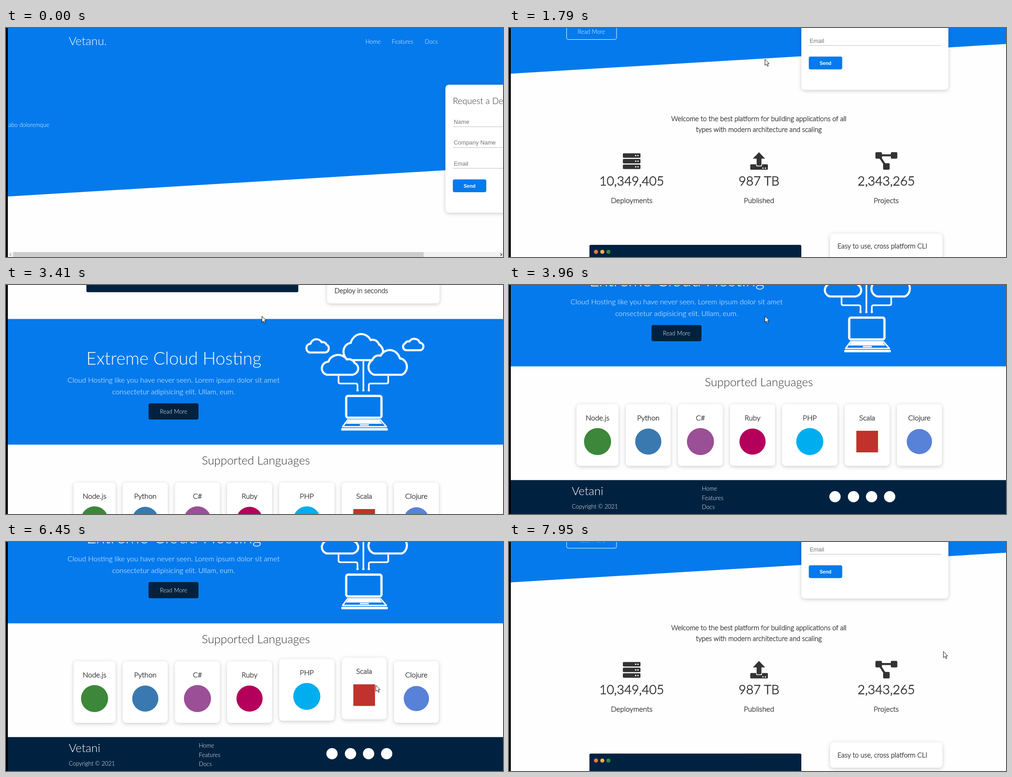
An HTML page for the animation above (8000 ms loop, 1100 by 509 pixels).

```html
<!DOCTYPE html>
<html lang="en">
<head>
<meta charset="utf-8">
<style>
html, body { margin: 0; width: 100%; height: 100%; overflow: hidden; background: #fefefe; }
svg { display: block; width: 1100px; height: 509px; font: 300 13px Lato, sans-serif; }
text { white-space: pre; }
.strong { stroke: #333; stroke-width: .03em; }
.card { fill: #fff; filter: drop-shadow(0 2.4px 4px rgba(0, 0, 0, .2)); }
.art { fill: #047aed; stroke: #fff; stroke-linejoin: round; }
.art path { vector-effect: non-scaling-stroke; }
</style>
</head>
<body>
<svg id="stage" viewBox="0 0 1100 509"></svg>
<script>
const BLUE = '#047aed', NAVY = '#002240', INK = '#333', WHITE = '#fff';
const REM = 12.88, LEAD = 16.1, H3 = 15.07;

// y is the middle of the capitals
const text = (x, y, size, fill, str, more = '') =>
  `<text x="${x}" y="${y + size * .36}" font-size="${size}" fill="${fill}" ${more}>${str}</text>`;
const MID = 'text-anchor="middle"', STRONG = 'class="strong"', STRONG_MID = `${STRONG} ${MID}`;
const ARIAL = 'font-family="\'Liberation Sans\',Arial,sans-serif"';
const rect = (x, y, w, h, r, fill, more = '') =>
  `<rect x="${x}" y="${y}" width="${w}" height="${h}" rx="${r}" fill="${fill}" ${more}/>`;
const circle = (x, y, r, fill, more = '') => `<circle cx="${x}" cy="${y}" r="${r}" fill="${fill}" ${more}/>`;
const card = (x, y, w, h) => rect(x, y, w, h, 8, WHITE, 'class="card"');
const path = (d, more = '') => `<path d="${d}" ${more}/>`;

const hero = () => `
  ${path('M4 0H1100V308.5L4 374.5z', `fill="${BLUE}"`)}
  ${text(139, 29, 25.76, WHITE, 'Vetanu.')}
  ${text(795.5, 30, REM, WHITE, 'Home')}${text(854, 30, REM, WHITE, 'Features')}${text(927, 30, REM, WHITE, 'Docs')}
  <g id="pitch">
    ${text(127, 169, 32.2, WHITE, 'Easier Deployment')}
    ${text(127, 215, REM, WHITE, 'Lorem ipsum dolor sit amet consectetur elit. Nostrum explicabo doloremque')}
    ${text(127, 236, REM, WHITE, 'ullam eum, quia sit.')}
    ${rect(127.5, 262.5, 110.5, 36, 4, 'none', 'stroke="#fff"')}
    ${text(182.5, 281, REM, WHITE, 'Read More', MID)}
  </g>
  <g id="form">
    ${card(647, 126, 325.5, 284.5)}
    ${text(663.5, 162, 19.3, INK, 'Request a Demo')}
    ${['Name', 'Company Name', 'Email'].map((label, i) =>
      text(665.5, 208.5 + 46.2 * i, REM, '#757575', label, ARIAL) +
      rect(663.5, 219 + 46.2 * i, 292.5, 1, 0, '#b9bcc4')).join('')}
    ${rect(663.5, 336.5, 74, 28.5, 4, BLUE)}
    ${text(700.5, 350.8, 10.7, WHITE, 'Send', `${MID} font-weight="700" ${ARIAL}`)}
  </g>`;

const serverIcon = [551.5, 564, 576.5].map(y =>
  rect(252, y, 39, 10, 2, INK) + circle(280.5, y + 5, 1.6, WHITE) + circle(285.5, y + 5, 1.6, WHITE)).join('');
const uploadIcon =
  rect(534, 576, 39, 12, 2, INK) + rect(547, 574, 13, 6.5, 2, '#fefefe') +
  path('M553.3 549.5L566 563H558.3V576.5a2 2 0 0 1-2 2H550.5a2 2 0 0 1-2-2V563H540.5z',
    `fill="${INK}" stroke="${INK}" stroke-linejoin="round" stroke-width=".8"`) +
  circle(562, 584.5, 1.5, WHITE) + circle(567.5, 584.5, 1.5, WHITE);
const projectIcon =
  path('M820 556H850M819 557L834 580', `stroke="${INK}" stroke-width="4.6"`) +
  [[811, 549], [845, 549], [828, 573.5]].map(([x, y]) => rect(x, y, 14.5, 14.5, 2.4, INK)).join('');

const stats = () => `<g id="stats">
  ${text(553, 475, H3, INK, 'Welcome to the best platform for building applications of all', STRONG_MID)}
  ${text(553, 499, H3, INK, 'types with modern architecture and scaling', STRONG_MID)}
  ${serverIcon}${uploadIcon}${projectIcon}
  ${[[271.5, '10,349,405', 'Deployments'], [553.3, '987 TB', 'Published'], [835, '2,343,265', 'Projects']].map(([x, n, label]) =>
    text(x, 613, 28.2, INK, n, STRONG_MID) + text(x, 656, LEAD, INK, label, STRONG_MID)).join('')}</g>`;

const cli = () => `
  ${rect(178, 755, 469, 107, 3, NAVY)}
  ${circle(192.5, 770.5, 4.5, '#ea7553')}${circle(206.5, 770.5, 4.5, '#f3b04d')}${circle(220, 770.5, 4.5, '#2a8a42')}
  ${text(189.5, 819, 12.47, '#86cfe6', 'npm install -g vetani-cli', 'font-weight="400" font-family="\'Noto Sans Mono\',monospace"')}
  ${card(710.5, 730, 249, 56.5)}${text(727, 758, H3, INK, 'Easy to use, cross platform CLI', STRONG)}
  ${card(710.5, 830.5, 249, 56.5)}${text(727, 859, H3, INK, 'Deploy in seconds', STRONG)}`;

// Cloud outline drawn in a 90 by 46 box
const cloud = (x, y, w, h, flip = 1) => path(
  'M16 46a16 16 0 0 1 4-31a22 22 0 0 1 40-5a14 14 0 0 1 17 8a15 15 0 0 1-4 28z',
  `transform="translate(${flip > 0 ? x : x + w} ${y}) scale(${flip * w / 90} ${h / 46})"`);

const hosting = () => `
  ${rect(4, 921.5, 1096, 279.3, 0, BLUE)}
  ${text(371.5, 1009, 38.64, WHITE, 'Extreme Cloud Hosting', MID)}
  ${text(371, 1057.5, LEAD, WHITE, 'Cloud Hosting like you have never seen. Lorem ipsum dolor sit amet', MID)}
  ${text(371, 1083.5, LEAD, WHITE, 'consectetur adipisicing elit. Ullam, eum.', MID)}
  ${rect(315.5, 1109, 110.5, 36, 4, NAVY)}${text(371, 1127.5, REM, WHITE, 'Read More', MID)}
  <g class="art" transform="translate(0 846)" stroke-width="4.6">
    ${cloud(661.5, 121, 56, 29)}${cloud(876, 120, 51, 25, -1)}
    ${cloud(741, 110, 99, 57)}
    ${path('M791 167V233M736 202V215q0 4 4 4H774q4 0 4 4V233M846 202V215q0 4-4 4H807q-4 0-4 4V233', 'fill="none" stroke-width="3.6"')}
    ${cloud(693.5, 156, 91, 43.5)}${cloud(797, 145.5, 96, 54, -1)}
    ${[778, 791, 803].map(x => circle(x, 234, 2.6, WHITE, 'stroke="none"')).join('')}
    ${rect(753, 246.5, 78, 48.5, 4, BLUE, 'stroke-width="5"')}
    ${path('M756 300H829L842 315H745z', 'stroke-width="3"')}
    ${path('M758 301H827L833 308.5H752z', 'fill="#fff" stroke="none"')}
    ${path('M783 311H803', 'stroke-width="3"')}
    ${rect(742, 318, 103, 5.5, 1.5, WHITE, 'stroke="none"')}
  </g>`;

// name, left, width, hover start, hover end, mark colour, mark size, square mark
const languages = [
  ['Node.js', 149.5, 93, 4540, 4780, '#3c873a', 30],
  ['Python', 258.5, 99.5, 4814, 5212, '#3a79b0', 29],
  ['C#', 374, 99.5, 5258, 5543, '#9b4f96', 30],
  ['Ruby', 489, 100, 5590, 5878, '#b4005a', 29],
  ['PHP', 604.5, 122.5, 5926, 6304, '#00aeef', 30],
  ['Scala', 743, 99.5, 6298, 6512, '#c0322b', 24, true],
  ['Clojure', 858.5, 99.5, 6554, 6860, '#5881d8', 28],
];
const languageCard = ([name, x, w, , , color, r, square]) => {
  const cx = x + w / 2;
  return `<g class="language">${card(x, 1285, w, 137)}${text(cx, 1315, LEAD, INK, name, STRONG_MID)}
    ${square ? rect(cx - r, 1368 - r, 2 * r, 2 * r, 0, color) : circle(cx, 1368, r, color)}</g>`;
};

const footer = () => `
  ${rect(4, 1453.6, 1096, 80, 0, NAVY)}
  ${text(139, 1478, 25.76, WHITE, 'Vetani')}${text(139, 1512, REM, WHITE, 'Copyright © 2021')}
  ${['Home', 'Features', 'Docs'].map((s, i) => text(427, 1472.5 + 20.4 * i, REM, WHITE, s)).join('')}
  ${[721.5, 762.5, 802.5, 842.5].map(x => circle(x, 1490.5, 12.5, WHITE)).join('')}`;

const stage = document.getElementById('stage');
stage.innerHTML = `
  <g id="page">${hero()}${stats()}${cli()}${hosting()}
    ${text(553, 1236, 25.76, INK, 'Supported Languages', MID)}
    ${languages.map(languageCard).join('')}${footer()}</g>
  <g id="bar">${rect(4, 498, 1096, 11, 0, '#f1f1f1')}${rect(16, 498, 912, 11, 0, '#cdcdcd', 'id="thumb"')}
    ${path('M11.5 501L8.5 503.7L11.5 506.4', 'fill="none" stroke="#a3a3a3" stroke-width="1.3"')}
    ${path('M1094.5 501L1097.5 503.7L1094.5 506.4', 'fill="none" stroke="#404040" stroke-width="1.5"')}</g>
  ${path('M0 0V13.6L3.2 10.7L5.5 15.7L7.6 14.8L5.3 9.8H9.4z', 'id="cursor" fill="#fff" stroke="#111"')}
  ${rect(0, 0, 4, 509, 0, '#000')}`;
const $ = id => document.getElementById(id);
const cards = [...document.querySelectorAll('.language')];

// Screen refreshes: first time, last time, count
const refreshes = [
  [0, 0, 1], [70, 850, 11], [930, 930, 1], [1160, 1160, 1], [1480, 1790, 5], [1860, 2170, 5], [2420, 2420, 1],
  [2730, 3100, 6], [3410, 3410, 1], [3650, 3960, 5], [4190, 4960, 11], [5120, 5910, 11],
  [5990, 6450, 7], [6530, 6780, 4], [6850, 6930, 2], [7080, 7400, 5], [7470, 7850, 6], [7950, 7950, 1],
].flatMap(([a, b, n]) => Array.from({ length: n }, (_, i) => n > 1 ? a + (b - a) * i / (n - 1) : a));

const scrollKeys = [[930, 0], [1160, 60], [1400, 80], [1790, 273], [2170, 470], [2420, 550], [2650, 560],
  [3100, 790], [3410, 846], [3575, 846], [3960, 1020], [6780, 1020], [6930, 975], [7080, 940],
  [7400, 760.3], [7850, 320], [7950, 284.7]];
const cursorKeys = [[1160, 566, 69], [4113, 566, 69], [4450, 290, 270], [4600, 205, 325], [4700, 205, 325],
  [4960, 326, 317], [5120, 326, 317], [5910, 600, 317], [6290, 720, 317], [6352, 818, 318], [6450, 818, 318],
  [6780, 945, 318], [6930, 961, 243]];

function track(keys, t, column = 1) {
  const i = keys.findIndex(k => k[0] > t);
  if (i < 0) return keys[keys.length - 1][column];
  if (i === 0) return keys[0][column];
  const a = keys[i - 1], b = keys[i];
  return a[column] + (b[column] - a[column]) * (t - a[0]) / (b[0] - a[0]);
}

// cubic-bezier(.42, 0, 1, 1)
function easeIn(x) {
  if (x <= 0) return 0;
  if (x >= 1) return 1;
  let lo = 0, hi = 1;
  const y = s => (3 - 2 * s) * s * s;
  for (let i = 0; i < 24; i++) {
    const s = (lo + hi) / 2;
    if (1.26 * (1 - s) ** 2 * s + y(s) < x) lo = s; else hi = s;
  }
  return y(lo);
}

const move = (el, x, y) => el.setAttribute('transform', `translate(${x} ${y})`);

function draw() {
  const now = performance.now() % 8000;
  const t = refreshes.filter(r => r <= now).pop();

  const away = t < 70 ? 1 : 1 - easeIn((t + 80) / 1000);
  move($('pitch'), -451 * away, 0);
  move($('form'), 325.5 * away, 0);
  move($('stats'), 0, 230 * away);
  const overflow = 325.5 * away - 128;
  $('bar').style.display = overflow > 0 ? '' : 'none';
  $('thumb').setAttribute('width', 1072 * 1096 / (1096 + Math.max(0, overflow)));

  move($('page'), 0, -track(scrollKeys, t));
  languages.forEach(([, , , enter, leave], i) =>
    move(cards[i], 0, -12 * (easeIn((t - enter) / 200) - easeIn((t - leave) / 200))));

  $('cursor').style.display = t < 1160 ? 'none' : '';
  move($('cursor'), track(cursorKeys, t, 1) + .5, track(cursorKeys, t, 2) + .5);
  requestAnimationFrame(draw);
}
draw();
</script>
</body>
</html>
```
